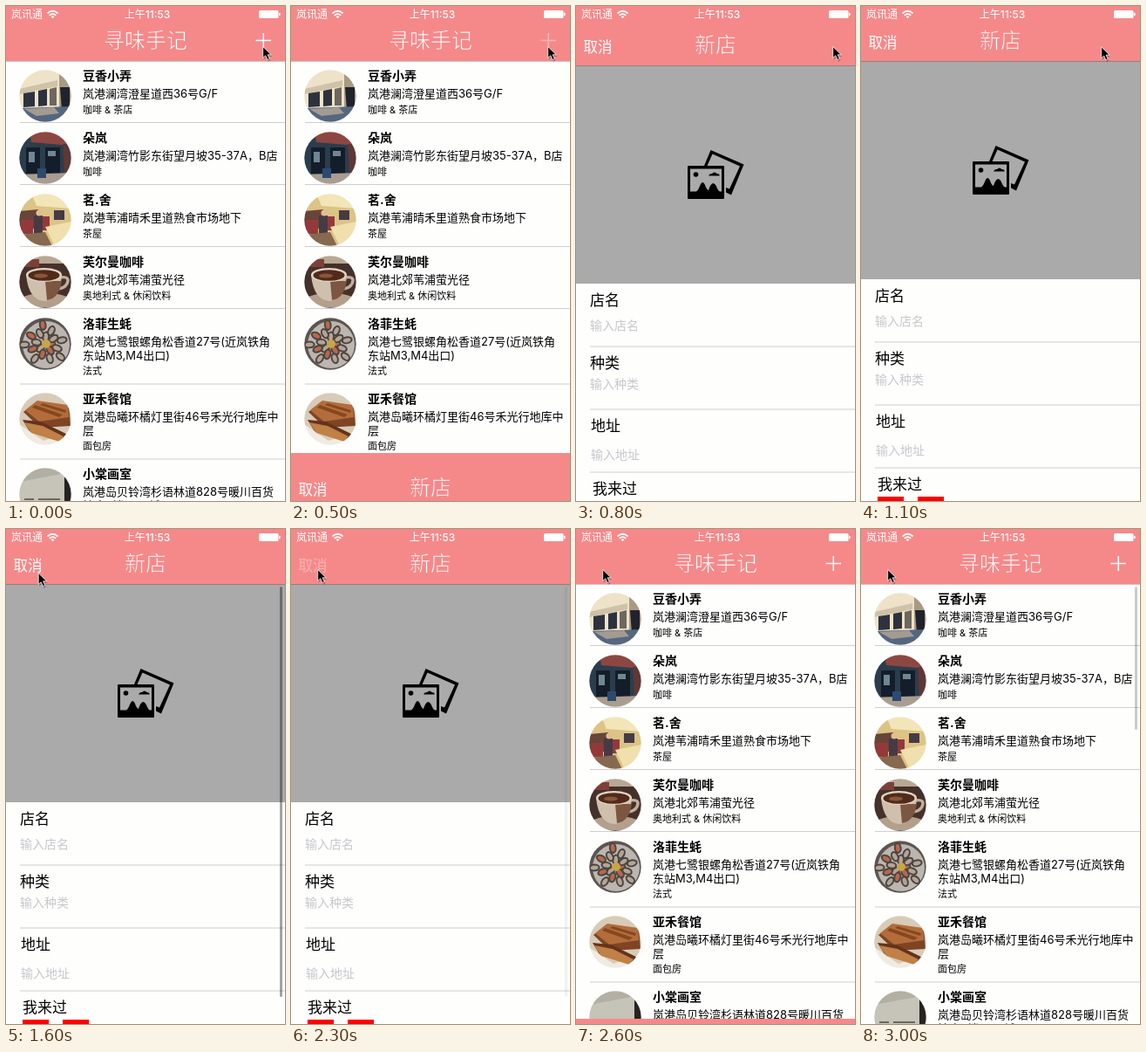
An HTML page for the animation above (3.1 s loop, 320 px wide and 567 px high).

```html
<!DOCTYPE html>
<html lang="zh-CN">
<head>
<meta charset="utf-8">
<style>
html, body { margin: 0; height: 100%; overflow: hidden; background: #fff; }
svg { display: block; width: 100vw; height: 100vh; }
text { font-family: Inter, "Noto Sans CJK SC", "Noto Sans CJK", "Noto Sans CJK JP", sans-serif; white-space: pre; }
</style>
</head>
<body>
<svg id="stage" viewBox="0 0 320 567"></svg>
<script>
const PINK = '#f5898a', LINE = '#cfced2', PAPER = '#fefefd';

const rect = (x, y, w, h, fill, more = '') =>
  `<rect x="${x}" y="${y}" width="${w}" height="${h}" fill="${fill}" ${more}/>`;
const path = (fill, d) => `<path fill="${fill}" d="${d}"/>`;
const disc = (x, y, r, fill) => `<circle cx="${x}" cy="${y}" r="${r}" fill="${fill}"/>`;
const oval = (x, y, rx, ry, fill, turn = 0) =>
  `<ellipse rx="${rx}" ry="${ry}" fill="${fill}" transform="translate(${x} ${y}) rotate(${turn})"/>`;
// y is the vertical middle of the glyphs
const text = (x, y, size, str, fill = '#000', more = '') =>
  `<text x="${x}" y="${y + size * .38}" font-size="${size}" fill="${fill}" ${more}>${str}</text>`;
// The pink outline thins the strokes to a light weight
const title = str =>
  text(160, 39, 24, str, '#fff', `text-anchor="middle" font-weight="300" stroke="${PINK}" stroke-width=".7"`);

function oysters() {
  let s = rect(0, 0, 60, 60, '#5c5550') + disc(31, 31, 27, '#bdb6b0');
  for (let i = 0; i < 18; i++) {
    const a = i * 2.4, r = 6 + i * 1.05, turn = a * 57.3;
    const x = 30 + r * Math.cos(a), y = 30 + r * Math.sin(a);
    s += oval(x, y, 6.5, 4.4, '#4a4542', turn) + oval(x, y, 4.4, 2.4, i % 3 ? '#b5a494' : '#b9674b', turn);
  }
  return s + disc(31, 30, 5, '#c9a548');
}

// Photos, each in a 60 x 60 box
const photos = [
  rect(0, 0, 60, 60, '#eee3c8') + path('#cfc2a8', 'M0 22L44 12V19L0 28Z') +
    path('#2e323e', 'M5 27L18 25V42L5 43ZM22 24L32 22V41L22 42Z') + path('#6d675f', 'M35 22L43 20V41H35Z') +
    path('#a99a84', 'M46 0L60 0V45H46Z') + path('#20222c', 'M47 20H58V47H49Z') +
    path('#55677f', 'M0 44L60 42V60H0Z') + path('#a39b92', 'M6 45L40 43L46 50L20 53Z'),
  rect(0, 0, 60, 60, '#2b3d4c') + path('#8d4742', 'M12 0H60V16L14 12Z') +
    path('#5f3736', 'M50 14H60V48H52Z') + path('#141d2a', 'M8 18H24V48H8ZM30 18H47V48H30Z') +
    path('#6f8693', 'M11 23H18V35H11ZM33 22H42V28H33Z') + path('#a99d90', 'M0 49L60 47V60H0Z') +
    path('#2c4a70', 'M21 42H31V53H21Z'),
  rect(0, 0, 60, 60, '#dcc386') + path('#f2e5b8', 'M14 0H60V17L20 14Z') +
    path('#694438', 'M0 20L22 18V40H0Z') + path('#94393a', 'M2 30H16V46H2ZM27 26H35V42H27Z') +
    path('#463a44', 'M17 25H27V47H17ZM40 19H52V30H40Z') + path('#f0e0ae', 'M30 38L60 32V54L40 58Z') +
    path('#86694e', 'M0 47L30 44L38 60H0Z') + disc(23, 22, 3.5, '#e3bd90'),
  rect(0, 0, 60, 60, '#46302a') + path('#b8a893', 'M0 0H60V9H0Z') + path('#7d4038', 'M6 4H23V13H6Z') +
    oval(30, 51, 28, 8, '#b3a08c') +
    '<path d="M47 25Q59 23 55 32Q52 38 43 38" fill="none" stroke="#bfae9b" stroke-width="3.500"/>' +
    path('#cfc0ad', 'M8 22H49Q47 51 29 52Q11 51 8 22Z') + path('#7c5640', 'M30 29H49Q46 49 32 51Z') +
    oval(28.5, 22, 20.5, 8, '#e2d5c3') + oval(28.5, 22.5, 18, 6.3, '#512a1c') + oval(25, 23, 8, 2.5, '#8a5638'),
  oysters(),
  rect(0, 0, 60, 60, '#d8cbb8') + path('#f0ebe2', 'M0 36L28 55L60 44V60H0Z') +
    path('#7f4424', 'M5 22L20 10L57 15L59 38L24 40Z') + path('#b36d3b', 'M7 20L21 9L56 14L57 28L23 33Z') +
    path('#64331d', 'M4 31L25 33L56 48L50 55L12 44Z') + path('#c08046', 'M6 34L27 38L51 50L46 56L14 46Z') +
    path('#87481f', 'M18 14L50 25L46 28L15 17ZM27 12L54 20L53 23L24 14Z'),
  rect(0, 0, 60, 60, '#c6c3b9') + path('#b3afa4', 'M0 0H60L54 6L0 16Z') + rect(52, 8, 8, 52, '#26221f') +
    rect(6, 35, 11, 2, '#6b675f') + rect(22, 35, 25, 2, '#6b675f')
];

// name, address lines, kind
const shops = [
  ['豆香小弄', ['岚港澜湾澄星道西36号G/F'], '咖啡 &amp; 茶店'],
  ['朵岚', ['岚港澜湾竹影东街望月坡35-37A，B店'], '咖啡'],
  ['茗.舍', ['岚港苇浦晴禾里道熟食市场地下'], '茶屋'],
  ['芙尔曼咖啡', ['岚港北郊苇浦萤光径'], '奥地利式 &amp; 休闲饮料'],
  ['洛菲生蚝', ['岚港七鹭银螺角松香道27号(近岚铁角', '东站M3,M4出口)'], '法式'],
  ['亚禾餐馆', ['岚港岛曦环橘灯里街46号禾光行地库中', '层'], '面包房'],
  ['小棠画室', ['岚港岛贝铃湾杉语林道828号暖川百货', '地库2楼30号铺'], '画廊']
];

function shopList() {
  let y = 80;
  return shops.map(([name, lines, kind], i) => {
    const extra = lines.length > 1 ? 15.5 : 0;
    const row = `<g transform="translate(15 ${y - 7})" clip-path="url(#round)"><g filter="url(#soft)">${photos[i]}</g></g>` +
      text(88, y - .3, 14, name, '#000', 'font-weight="700"') +
      lines.map((s, k) => text(88, y + 20.5 + k * 15.5, 13, s)).join('') +
      text(88, y + 38.5 + extra, 11, kind) +
      rect(16, y + 53 + extra, 304, 1, LINE);
    y += extra ? 86 : 71;
    return row;
  }).join('');
}

const field = (x, y, label, hintY) =>
  text(x, y, 17, label) + text(x, hintY, 14, '输入' + label, '#c7c7cd') + rect(16, y + 53, 304, 1, LINE);

const pictureIcon =
  path('#000', 'M147 178L154.500 160L192.500 176.500L178 211.500L172 208.500V203L176 204.500L188 178.500L156.500 164.500L150.500 178Z') +
  rect(128, 178, 42, 38, '#000', 'rx="1"') + rect(131, 181.5, 36, 26, '#aaa') + disc(137.5, 188, 2.8, '#000') +
  path('#000', 'M152 189.500Q153 186.500 156 187Q159 184 161.500 187Q165 187 164.500 189.500Z' +
    'M137 209Q141 205 143 199Q145 195 147.500 199Q150 206 152 206Q154 199 157 198Q160 198 162 204Q163 207 167 209Z');

const statusBar = text(6, 9.7, 12, '岚讯通', '#fff') +
  '<g fill="none" stroke="#fff" stroke-width="1.700"><path d="M47.500 8.500Q53.500 3 59.500 8.500M49.800 10.800Q53.500 7.300 57.200 10.800"/></g>' +
  path('#fff', 'M51.500 12Q53.500 10.500 55.500 12L53.500 14.200Z') +
  text(162, 9.5, 12, '上午11:53', '#fff', 'text-anchor="middle" font-weight="500"') +
  rect(290, 5, 22.5, 9, '#fff', 'rx="1.500"') + rect(313, 7.8, 1.6, 3.4, '#fff', 'rx=".8"');

stage.innerHTML = `
  <defs>
    <clipPath id="round">${disc(30, 30, 29.7, '#000')}</clipPath>
    <filter id="soft" x="-.1" y="-.1" width="1.2" height="1.2"><feGaussianBlur stdDeviation=".6"/></filter>
  </defs>
  ${rect(0, 0, 320, 567, PAPER)}
  ${shopList()}
  ${rect(314, 66, 3, 164, '#000', 'id="listBar" rx="1.500"')}
  ${rect(0, 0, 320, 63, PINK)}${rect(0, 63, 320, 1, '#dcc0c0')}${title('寻味手记')}
  <path id="plus" d="M286.500 39.500H304M295.250 31V48" stroke="#fff" stroke-width="1.500"/>
  <g id="sheet">
    ${rect(0, 0, 320, 567, PAPER)}
    ${rect(0, 63, 320, 250, '#aaa')}${pictureIcon}
    ${field(16, 331.5, '店名', 360.5)}
    ${field(16, 403.5, '种类', 427.5)}
    ${field(17, 475.5, '地址', 508.5)}
    ${text(19, 547.5, 17, '我来过')}
    ${rect(19, 562, 30, 30, '#f00')}${rect(65, 562, 30, 30, '#f00')}
    ${rect(0, 0, 320, 63, PINK)}${rect(0, 63, 320, 1, '#957f80')}
    ${title('新店')}${text(8.5, 41.5, 16.5, '取消', '#fff', 'id="cancel"')}
    ${rect(314, 66, 3, 470, '#000', 'id="formBar" rx="1.500"')}
  </g>
  ${statusBar}
  <g id="cursor">
    <path d="M1 2V17L4.500 14L7 19.500L10 18L7.500 13H12Z" fill="#0004"/>
    <path d="M0 0V14.800L3.500 11.600L5.900 17.200L8.600 16L6.200 10.600H10.800Z" stroke="#fff" stroke-width=".9"/>
  </g>`;

// Linear value between [time, value] keys
function track(t, ...keys) {
  const i = keys.findIndex(k => k[0] > t);
  if (i === 0) return keys[0][1];
  if (i < 0) return keys.at(-1)[1];
  const [a, u] = keys[i - 1], [b, v] = keys[i];
  return u + (v - u) * (t - a) / (b - a);
}
const ease = (t, a, b) => {
  const p = Math.min(1, Math.max(0, (t - a) / (b - a)));
  return p * p * (3 - 2 * p);
};
// Remaining share of a critically damped spring
const spring = (t, start) => {
  const x = Math.max(0, t - start) * .02085;
  return (1 + x) * Math.exp(-x);
};
const fade = (el, v) => el.setAttribute('opacity', v);
const move = (el, x, y, size = 1) => el.setAttribute('transform', `translate(${x} ${y}) scale(${size})`);

function draw(now) {
  const t = Math.floor(now % 3100 / 100) * 100; // ten pictures a second
  const hidden = t <= 2300 ? spring(t, 475) : 1 - spring(t, 2282);
  move(sheet, 0, Math.round(567 * hidden));
  const across = ease(t, 1000, 1600), settle = ease(t, 1600, 2000);
  move(cursor, 294.7 - 257.5 * across - 6.5 * settle, 46.5 + 4 * across - 4 * settle, .88);
  fade(plus, track(t, [200, 1], [300, .2], [400, .2], [600, .55], [900, 1]));
  fade(cancel, track(t, [2100, 1], [2200, .2], [2300, .35], [2400, .6], [2700, 1]));
  fade(formBar, track(t, [1100, 0], [1300, .36], [2000, .36], [2300, .05], [2400, 0]));
  fade(listBar, track(t, [2900, 0], [3000, .2]));
}

const start = performance.now();
function loop() {
  draw(performance.now() - start);
  requestAnimationFrame(loop);
}
loop();
</script>
</body>
</html>
```
